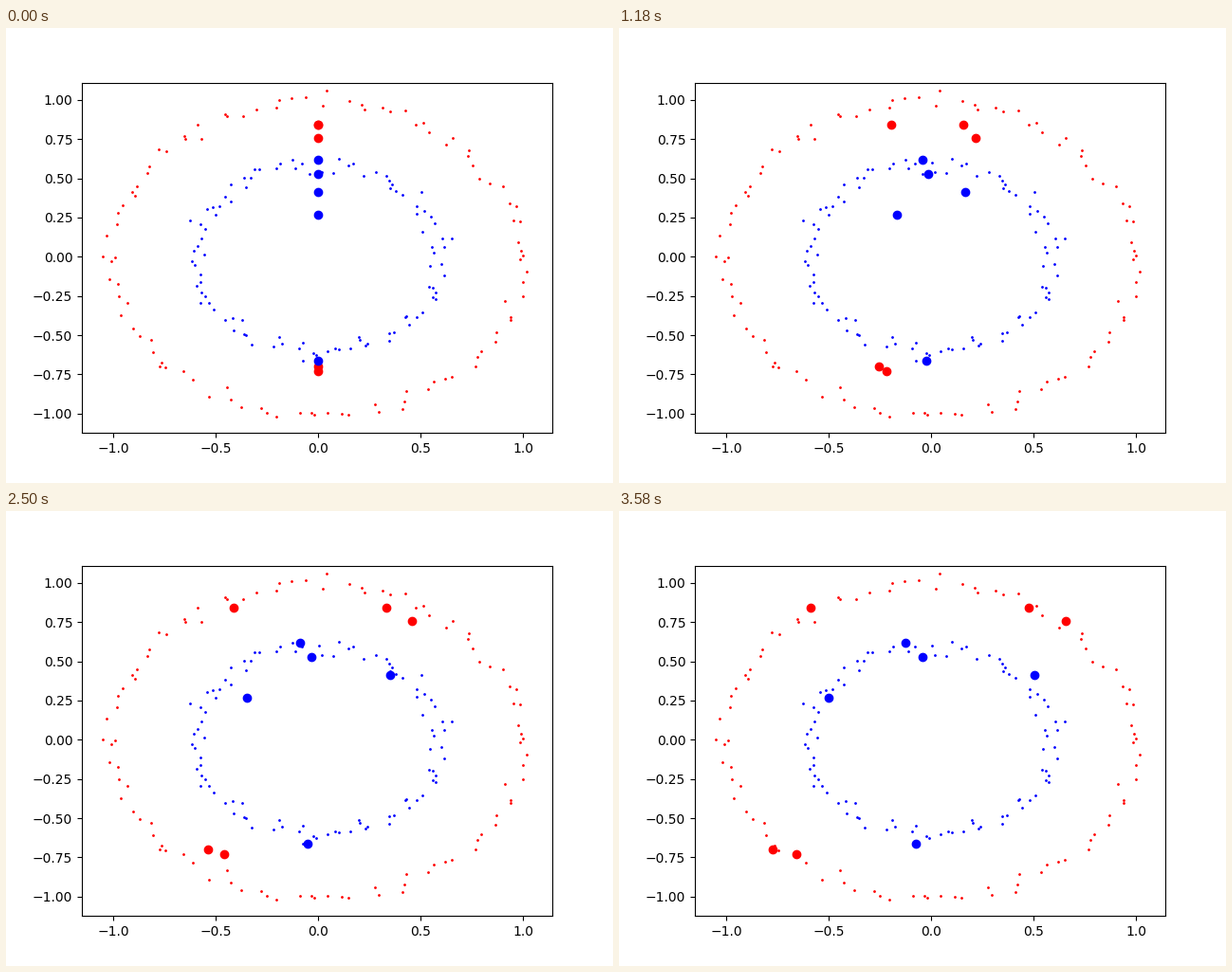
Write a matplotlib script that moves like this. It is 640 by 480 pixels and loops after 3.6 s.

```python
import numpy as np
import matplotlib.pyplot as plt
from matplotlib.animation import FuncAnimation

FRAMES = 180
INTERVAL = 20
POINTS = 100
NOISE = 0.03

# Ring colour, radius, and the ring points that the large dots travel to.
RINGS = [
    ("red", 1.0, [(0.478, 0.842), (0.655, 0.757), (-0.587, 0.842),
                  (-0.772, -0.700), (-0.657, -0.731)]),
    ("blue", 0.6, [(-0.125, 0.618), (-0.044, 0.528), (0.505, 0.412),
                   (-0.500, 0.268), (-0.074, -0.664)]),
]

rng = np.random.default_rng(7)


def noisy_ring(radius, ends):
    """Evenly spaced points with noise, passing through the given ends."""
    angle = np.linspace(0, 2 * np.pi, POINTS, endpoint=False)
    points = radius * np.column_stack([np.cos(angle), np.sin(angle)])
    points += rng.normal(0, NOISE, points.shape).clip(-2 * NOISE, 2 * NOISE)
    for end in ends:
        nearest = np.hypot(*(points - end).T).argmin()
        points[nearest] = end
    return points


fig, ax = plt.subplots(figsize=(6.4, 4.8), dpi=100)
ax.set_xlim(-1.1528, 1.1431)
ax.set_ylim(-1.1235, 1.1105)

movers = []
for color, radius, ends in RINGS:
    ends = np.array(ends)
    ax.scatter(*noisy_ring(radius, ends).T, s=1, color=color)
    dots, = ax.plot(np.zeros(len(ends)), ends[:, 1], "o", color=color)
    movers.append((dots, ends[:, 0]))


def update(i):
    for dots, end_x in movers:
        dots.set_xdata(end_x * i / (FRAMES - 1))
    return [dots for dots, _ in movers]


anim = FuncAnimation(fig, update, frames=FRAMES, interval=INTERVAL,
                     repeat=True, repeat_delay=0)
plt.show()
```
